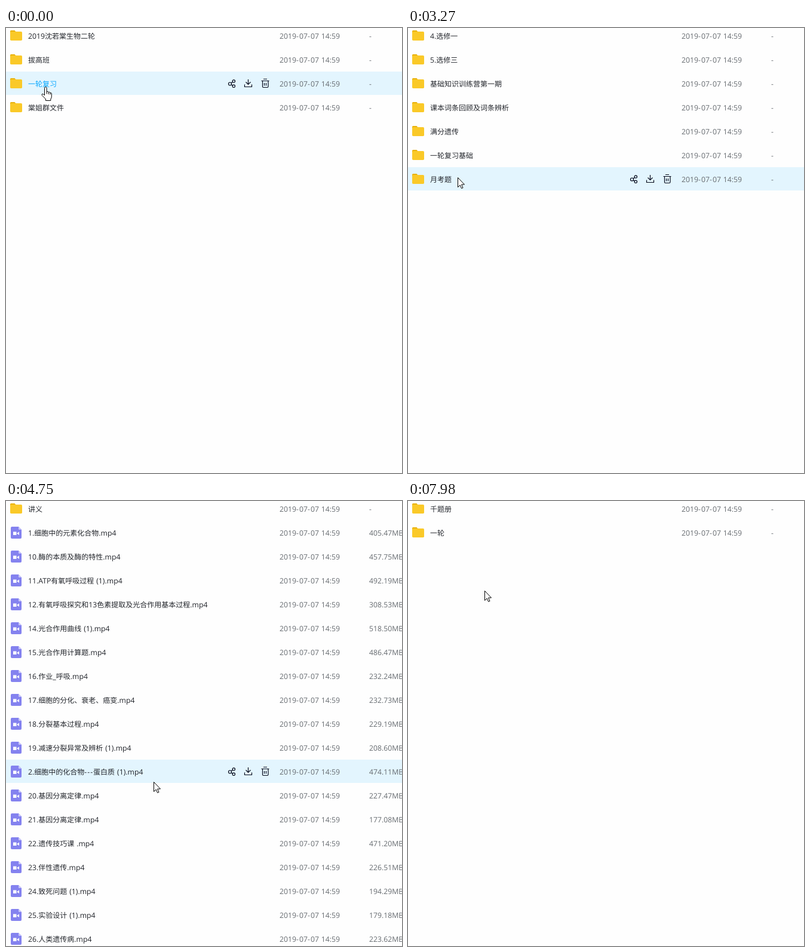
These frames come from a looping animation (663 px wide and 745 px high, 8 s). An HTML page:

```html
<!DOCTYPE html>
<html lang="zh-CN">
<head>
<meta charset="utf-8">
<title>文件列表</title>
<style>
html, body { margin: 0; width: 100%; height: 100%; overflow: hidden; background: #fefefe; }
svg { display: block; }
text { font: 12px "Noto Sans CJK SC", "Noto Sans CJK", sans-serif; fill: #23262c; text-rendering: geometricPrecision; }
.latin { font: 12.25px "Open Sans", sans-serif; word-spacing: .7px; }
.dash { letter-spacing: 1px; }
.meta { fill: #666b70; }
.link { fill: #06a7ff; }
#actions { fill: none; stroke: #060a1c; stroke-width: 1.2; }
.cursor { fill: #fff; stroke: #000; stroke-linejoin: round; }
</style>
</head>
<body>
<svg width="663" height="745" viewBox="0 0 663 745">
  <defs>
    <g id="folder">
      <path d="M7 14V5.5q0-1.500 1.500-1.500h6l2 2.200H25V14z" fill="#e9b20c"/>
      <rect x="7" y="6" width="20" height="15" rx="1.800" fill="#fac928"/>
    </g>
    <g id="video">
      <path d="M10 3H21L26 8V21q0 2-2 2H10q-2 0-2-2V5q0-2 2-2z" fill="#8482ef"/>
      <path d="M21 3L26 8H22q-1 0-1-1z" fill="#c9c8fa"/>
      <path d="M12 11.500h5.500v5.500H12zM18 14.200l4-2.700v5.500z" fill="#fff"/>
    </g>
  </defs>
  <rect id="bar" y="-7" width="663" height="39" fill="#e3f5fe"/>
  <g id="lists"></g>
  <g id="actions">
    <circle cx="375" cy="13.500" r="2.500"/>
    <circle cx="381.300" cy="9" r="2.200"/>
    <circle cx="381.300" cy="17.300" r="2.200"/>
    <path d="M377.200 12.200L379.500 10.300M377.200 14.800L379.500 16.300"/>
    <path d="M405.500 6V14.500M401.500 10.500L405.500 14.500L409.500 10.500M399.500 14.500V18.500H411.500V14.500"/>
    <path d="M427.500 8.500H440.500M431 5.500H437M429.500 8.500V18q0 1.500 1.500 1.500H437.500q1.500 0 1.500-1.500V8.500M432.500 12V16.500M435.500 12V16.500"/>
  </g>
  <path id="arrow" class="cursor" d="M.5 .5V16.500L4.200 13L6.600 18.500L9 17.500L6.600 12H11.500Z"/>
  <g id="hand" class="cursor">
    <path d="M-1.500 14V2.500a1.800 1.800 0 0 1 3.600 0V8.500q2.600-.8 3.100.9q2-.8 2.800 1q2-.5 2.300 1.600V17q0 2-1.500 4v2.500H.5V21L-5.800 14.600q-.8-1.800.8-2.200q1.300-.1 3.500 2.200z"/>
    <path d="M2.100 8.500V12.500M5.200 9.400V13M8 10.400V13.500" fill="none"/>
  </g>
</svg>
<script>
const $ = id => document.getElementById(id);
const ROW = 40, LOOP = 8000, STEP = 138;
const folders = names => names.split('|').map(name => ({ name, size: '-', icon: 'folder' }));

const root = folders('2019沈若棠生物二轮|拔高班|一轮复习|棠姐群文件');
const books = folders('千题册|一轮');
const topics = folders('4.选修一|5.选修三|基础知识训练营第一期|课本词条回顾及词条辨析|满分遗传|一轮复习基础|月考题');
const videos = folders('讲义').concat(`1.细胞中的元素化合物|405.47
10.酶的本质及酶的特性|457.75
11.ATP有氧呼吸过程 (1)|492.19
12.有氧呼吸探究和13色素提取及光合作用基本过程|308.53
14.光合作用曲线 (1)|518.50
15.光合作用计算题|486.47
16.作业_呼吸|232.24
17.细胞的分化、衰老、癌变|232.73
18.分裂基本过程|229.19
19.减速分裂异常及辨析 (1)|208.60
2.细胞中的化合物---蛋白质 (1)|474.11
20.基因分离定律|227.47
21.基因分离定律|177.08
22.遗传技巧课 |471.20
23.伴性遗传|226.51
24.致死问题 (1)|194.29
25.实验设计 (1)|179.18
26.人类遗传病|223.62`.split('\n').map(line => {
  const [name, size] = line.split('|');
  return { name: name + '.mp4', size: size + 'MB', icon: 'video' };
}));

// Each page opens at a time.
const pages = [[0, root], [530, books], [1890, topics], [4240, videos], [5700, topics], [6560, books]];
// Pointer legs: first step, last step, end point.
const legs = [
  [0, 0, 66, 98], [530, 530, 65, 98], [800, 1070, 65, 63], [1200, 1490, 56, 54],
  [2450, 2570, 61, 53], [2720, 2990, 88, 378], [3130, 3270, 83, 250], [3420, 3960, 94, 213],
  [4390, 4510, 195, 318], [4630, 4900, 288, 592], [5580, 5580, 287, 589],
  [5980, 6250, 252, 542], [6710, 6710, 249, 540], [6990, 7980, 128, 150]
];

const tspan = (kind, s) => `<tspan class="${kind}">${s}</tspan>`;
const latin = s => s.replace(/[\x20-\x7e]+/g, run =>
  tspan('latin', run.replace(/-+/g, dashes => tspan('dash', dashes))));
const cell = (kind, x, s) => `<text class="${kind}" x="${x}" y="18">${latin(s)}</text>`;
const rowMarkup = ({ name, size, icon }, i) => `<g transform="translate(0 ${i * ROW})">
  <use href="#${icon}"/>${cell('name', 37, name)}
  ${cell('meta', 458, '2019-07-07 14:59')}${cell('meta', 608, size)}</g>`;

const lists = [root, books, topics, videos];
$('lists').innerHTML = lists.map(list => `<g>${list.map(rowMarkup).join('')}</g>`).join('');
const groups = [...$('lists').children];

const show = (el, on) => el.setAttribute('display', on ? 'inline' : 'none');
const place = (el, x, y) => el.setAttribute('transform', `translate(${x} ${y})`);

// The pointer advances in discrete steps, slowing towards the end of each leg.
function pointer(t) {
  const i = legs.findLastIndex(leg => leg[0] <= t);
  const [from, to, x, y] = legs[i];
  const [, , x0, y0] = legs[Math.max(0, i - 1)];
  const gaps = Math.round((to - from) / STEP);
  const done = gaps ? Math.floor((t - from + .5) / (to - from) * gaps) : 0;
  const p = Math.min(1, (done + 1) / (gaps + 1));
  const ease = p * (2 - p);
  return [x0 + (x - x0) * ease, y0 + (y - y0) * ease].map(Math.round);
}

function paint(t) {
  const list = pages.findLast(page => page[0] <= t)[1];
  const group = groups[lists.indexOf(list)];
  const [x, y] = pointer(t);
  const row = Math.floor((y + 1) / ROW);
  groups.forEach(g => show(g, g === group));

  let onLink = false;
  group.querySelectorAll('.name').forEach((label, i) => {
    const hit = i === row && Math.abs(y - row * ROW - 13) < 9 && x < 37 + label.getComputedTextLength();
    label.classList.toggle('link', hit);
    onLink ||= hit;
  });
  for (const id of ['bar', 'actions']) {
    show($(id), row < list.length);
    place($(id), 0, row * ROW);
  }
  show($('hand'), onLink);
  show($('arrow'), !onLink);
  place($('hand'), x, y);
  place($('arrow'), x, y);
}

const start = performance.now();
function tick() {
  paint((performance.now() - start) % LOOP);
  requestAnimationFrame(tick);
}
tick();
</script>
</body>
</html>
```
